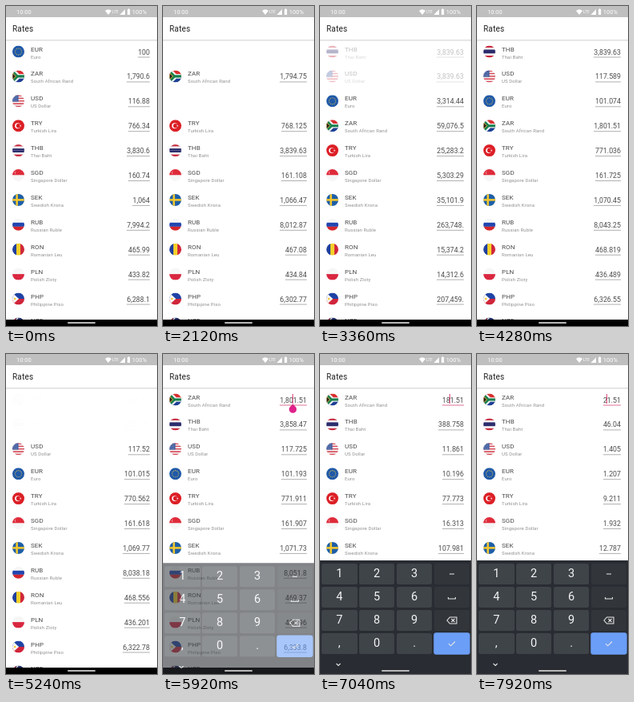
An HTML page for the animation above (8 s loop, 189 by 400 pixels).

```html
<!DOCTYPE html>
<html lang="en">
<head>
<meta charset="utf-8">
<title>Rates</title>
<style>
  html, body { margin: 0; width: 100%; height: 100%; overflow: hidden; background: #fff; }
  #stage { position: relative; width: 189px; height: 400px; overflow: hidden; background: #fff;
    font-family: Roboto, "Noto Sans", sans-serif; color: #4a4a4a; }
  #stage div, #stage svg { position: absolute; display: block; white-space: nowrap; }
  #status { left: 0; top: 0; width: 189px; height: 14px; background: #bfbfbf; color: #fff;
    font: 400 7.5px/15px Roboto, sans-serif; }
  #bar { left: 0; top: 14px; width: 189px; height: 28px; background: #fff;
    border-bottom: 1px solid #dcdcdc; box-shadow: 0 1px 1px #f0f0f0; }
  #bar div { left: 8px; top: 8px; font: 400 10px/13px Roboto, sans-serif; letter-spacing: .2px; color: #222; }
  #list { left: 0; top: 43px; width: 189px; height: 349px; overflow: hidden; }
  .row { left: 0; top: 0; width: 189px; height: 31px; }
  .flag { left: 8px; top: 8px; width: 15px; height: 15px; border-radius: 50%; }
  .code { left: 31px; top: 7.8px; font-size: 8px; line-height: 10px; letter-spacing: .1px; }
  .name { left: 31px; top: 17.2px; font-size: 6px; line-height: 9px; letter-spacing: .1px; color: #909090; }
  .val { right: 9px; top: 10.5px; font-size: 8.8px; line-height: 11px; min-width: 15px; text-align: right;
    border-bottom: 1px solid #b0b0b0; }
  .focus .val { border-color: #e0708f; }
  #caret { left: 162.3px; top: 50px; width: 1px; height: 12px; background: #e0457b; }
  #handle { left: 157px; top: 62px; }
  #nav { left: 0; top: 392px; width: 189px; height: 8px; background: #000; }
  #pill { left: 77px; top: 395px; width: 35px; height: 2px; border-radius: 1px; background: #b8b8b8; }
  #keys { left: 0; top: 258px; width: 189px; height: 160px; background: #292c32; }
  .key { width: 44.6px; height: 26px; border-radius: 2.5px; background: #3f4449; color: #f4f4f4;
    font: 400 14.5px/26px Roboto, sans-serif; text-align: center; overflow: hidden; }
  .key.side { background: #32363b; }
  .key.enter { background: #6b9ef6; box-shadow: 0 0 0 .7px #6b9ef6; }
  .key svg { left: 14.3px; top: 5px; }
  .glow { inset: 0; background: #fff; opacity: 0; }
</style>
</head>
<body>
<div id="stage">
  <div id="list"></div>
  <div id="caret"></div>
  <svg id="handle" width="11" height="12" viewBox="0 0 11 12"><path d="M5.5 .6 9 4a4.7 4.7 0 1 1-7 0z" fill="#e0218a"/></svg>
  <div id="bar"><div>Rates</div></div>
  <div id="status">
    <div style="left:13px">10:00</div>
    <svg width="189" height="14" fill="#fff">
      <path d="M124 5.9q4-3.2 8 0l-4 5z"/>
      <path d="M149 4.3v6.6h-6.6z"/>
      <path d="M152 4.1h1v-.8h1.2v.8h1v7H152z"/>
    </svg>
    <div style="left:133px;font-size:5px">LTE</div>
    <div style="right:13px">100%</div>
  </div>
  <div id="nav"></div>
  <div id="keys"></div>
  <div id="pill"></div>
</div>
<script>
const LOOP = 8000, PITCH = 30.9, TOP = -1.5;
const $ = id => document.getElementById(id);
const clamp = x => Math.max(0, Math.min(1, x));
const ease = x => (1 - Math.cos(Math.PI * x)) / 2;
const add = (parent, cls, html = '') => {
  const el = document.createElement('div');
  el.className = cls;
  el.innerHTML = html;
  parent.appendChild(el);
  return el;
};

// Flags on a 24 x 24 field
const rect = (x, y, w, h, c) => `<rect x="${x}" y="${y}" width="${w}" height="${h}" fill="${c}"/>`;
const path = (d, c, extra = '') => `<path d="${d}" fill="${c}" ${extra}/>`;
const dot = (x, y, r, c) => `<circle cx="${x}" cy="${y}" r="${r}" fill="${c}"/>`;
const bands = (...cs) => cs.map((c, i) => rect(0, i * 24 / cs.length, 24, 24 / cs.length + .1, c)).join('');
const pales = (...cs) => cs.map((c, i) => rect(i * 24 / cs.length, 0, 24 / cs.length + .1, 24, c)).join('');
const ring = (n, r, c) => Array.from({ length: n }, (_, i) => {
  const a = i * 2 * Math.PI / n;
  return dot(12 + r * Math.sin(a), 12 - r * Math.cos(a), .9, c);
}).join('');
const WHITE = '#f6f6f6', RED = '#d64a58';

const money = [
  ['EUR', 'Euro', rect(0, 0, 24, 24, '#2059a8') + ring(12, 6.5, '#e0c44c')],
  ['ZAR', 'South African Rand', bands('#d8302f', '#1d3f94') + path('M0 0 12 12 0 24M10 12H24', 'none', 'stroke="#efefef" stroke-width="9"')
    + path('M-1 1 10 12-1 23M9 12H24', 'none', 'stroke="#17804d" stroke-width="5"') + path('M0 5 7 12 0 19z', '#222', 'stroke="#f0b832" stroke-width="1.5"')],
  ['USD', 'US Dollar', bands(RED, WHITE, RED, WHITE, RED, WHITE, RED, WHITE, RED)
    + rect(0, 0, 12, 13.3, '#3d5b9e') + [3, 6, 9].map(x => dot(x, 4, .7, '#fff') + dot(x, 7.5, .7, '#fff') + dot(x, 11, .7, '#fff')).join('')],
  ['TRY', 'Turkish Lira', rect(0, 0, 24, 24, '#dc1f26') + dot(10.5, 12, 5.5, '#fff') + dot(12, 12, 4.4, '#dc1f26')
    + path('M14 12l4-1.5-2.5 3.5v-4l2.5 3.5z', '#fff')],
  ['THB', 'Thai Baht', bands('#c6283c', WHITE, '#2b2c6c', '#2b2c6c', WHITE, '#c6283c')],
  ['SGD', 'Singapore Dollar', bands('#df2b3a', WHITE) + dot(7, 7, 2.6, '#f0a0a6') + dot(8.4, 7, 2.5, '#df2b3a')],
  ['SEK', 'Swedish Krona', rect(0, 0, 24, 24, '#1e5fa6') + rect(7, 0, 4, 24, '#f5ca2e') + rect(0, 10, 24, 4, '#f5ca2e')],
  ['RUB', 'Russian Ruble', bands(WHITE, '#2146b0', '#d5262d')],
  ['RON', 'Romanian Leu', pales('#1f3f9c', '#f5cf2b', '#d0273a')],
  ['PLN', 'Polish Zloty', bands(WHITE, '#d92740')],
  ['PHP', 'Philippine Piso', bands('#1e43a5', '#d0253a') + path('M0 0 13 12 0 24z', WHITE) + dot(5, 12, 2, '#f4c92f')],
  ['NZD', 'New Zealand Dollar', rect(0, 0, 24, 24, '#22306b') + path('M0 0 12 12M12 0 0 12', 'none', 'stroke="#e8e8e8" stroke-width="2"')
    + rect(5, 0, 2, 12, '#d0303c') + dot(17, 8, 1.3, '#d0303c') + dot(17, 17, 1.3, '#d0303c')]
];

// Amounts follow the order of the money list
const quote = text => text.split(' ').map(Number);
const scale = (list, k, keep) => list.map((v, i) => i === keep ? v : v * k);
const open = quote('100 1790.6 116.88 766.34 3830.6 160.74 1064 7994.2 465.99 433.82 6288.1 174.92');
const euro = quote('100 1794.75 117.15 768.125 3839.63 161.108 1066.47 8012.87 467.08 434.84 6302.77 175.33');
const swap = quote('3314.44 59076.5 3839.63 25283.2 3839.63 5303.29 35101.9 263748.2 15374.2 14312.6 207459.3 5771.2');
const baht = quote('101.074 1801.51 117.589 771.036 3839.63 161.725 1070.45 8043.25 468.819 436.489 6326.55 176');
const rand = quote('101.015 1801.51 117.52 770.562 3851.75 161.618 1069.77 8038.18 468.556 436.201 6322.78 175.89');
const edit = quote('101.193 1801.51 117.725 771.911 3858.47 161.907 1071.73 8051.8 469.37 436.96 6333.8 176.2');
const done = quote('1.207 21.51 1.405 9.211 46.04 1.932 12.787 96.07 5.6 5.214 75.57 2.102');
const typed = amount => scale(edit, amount / 1801.51);

const ticks = [
  [0, open],
  [160, scale(open, 1.0011, 0)],
  [1040, euro],
  [2760, swap],
  [4000, baht],
  [5000, rand],
  [5800, edit],
  [6800, typed(181.51)],
  [7080, typed(11.51)],
  [7360, typed(1.51)],
  [7640, done]
];
const show = v => v.toLocaleString('en-US', { maximumFractionDigits: 3 }).slice(0, 8);

// start, row that goes to the top, fade-out lead
const moves = [[2120, 2, 0], [3080, 4, 120], [5000, 1, 0]];
const orders = [money.map((_, i) => i)];
for (const [, id] of moves) {
  const last = orders[orders.length - 1];
  orders.push([id, ...last.filter(i => i !== id)]);
}

const rows = money.map(([code, name, art]) => {
  const el = add($('list'), 'row', `<svg class="flag" viewBox="0 0 24 24">${art}</svg>`);
  add(el, 'code', code);
  add(el, 'name', name);
  return { el, val: add(el, 'val') };
});

// Keypad
const icon = d => `<svg width="16" height="16" viewBox="0 0 16 16" fill="none" stroke="#e6e6e6" stroke-width="1.1"><path d="${d}"/></svg>`;
const pad = ['1', '2', '3', icon('M5 8h6'), '4', '5', '6', icon('M3.5 8v2h9V8'),
  '7', '8', '9', icon('M5.5 4H14v8H5.5L2 8zM7.5 6l4 4m0-4-4 4'), ',', '0', '.', icon('M4 8.2 6.7 10.8l5.3-5.3')];
const glows = pad.map((label, i) => {
  const key = add($('keys'), 'key' + (i === 15 ? ' enter' : i % 4 === 3 ? ' side' : ''), label);
  key.style.left = 2 + i % 4 * 46.9 + 'px';
  key.style.top = 3.5 + Math.floor(i / 4) * 29 + 'px';
  return add(key, 'glow');
});
add($('keys'), '', icon('M5.5 7 8 9.5 10.5 7')).style.cssText = 'left:15px;top:122px';
const presses = [[6800, 11], [7080, 11], [7360, 11], [7640, 1]];

function place(t) {
  const n = moves.filter(([at]) => t >= at).length;
  const to = orders[n], from = orders[Math.max(0, n - 1)];
  const since = n ? t - moves[n - 1][0] : LOOP;
  const next = moves[n];
  rows.forEach(({ el }, i) => {
    const fresh = n && (i === to[0] || i === from[0]);
    const a = from.indexOf(i), b = to.indexOf(i);
    const slot = fresh ? b : a + (b - a) * ease(clamp(since / 240));
    let alpha = fresh ? clamp((since - 240) / 120) : 1;
    if (next && next[2] && (i === next[1] || i === to[0]))
      alpha *= clamp((next[0] - t) / next[2]);
    el.style.transform = `translateY(${TOP + PITCH * slot}px)`;
    el.style.opacity = alpha;
  });
}

function price(t) {
  const [, list] = ticks.filter(([at]) => t >= at).pop();
  rows.forEach(({ val }, i) => { val.textContent = show(list[i]); });
}

function type(t) {
  const focus = t >= 5800;
  rows[1].el.classList.toggle('focus', focus);
  $('caret').style.opacity = focus && !(t >= 6360 && t < 6800) ? 1 : 0;
  $('handle').style.opacity = focus && t < 6800 ? 1 : 0;
  // The keypad rises a little while it fades in
  const left = 1 - clamp((t - 5840) / 320);
  $('keys').style.transform = `translateY(${14 * left ** 5}px)`;
  $('keys').style.opacity = 1 - left ** 3;
  glows.forEach((g, i) => {
    const hit = presses.find(([at, key]) => key === i && t >= at && t < at + 220);
    g.style.opacity = hit ? .2 * (1 - (t - hit[0]) / 220) : 0;
  });
}

function draw() {
  const t = performance.now() % LOOP;
  place(t);
  price(t);
  type(t);
  requestAnimationFrame(draw);
}
draw();
</script>
</body>
</html>
```
